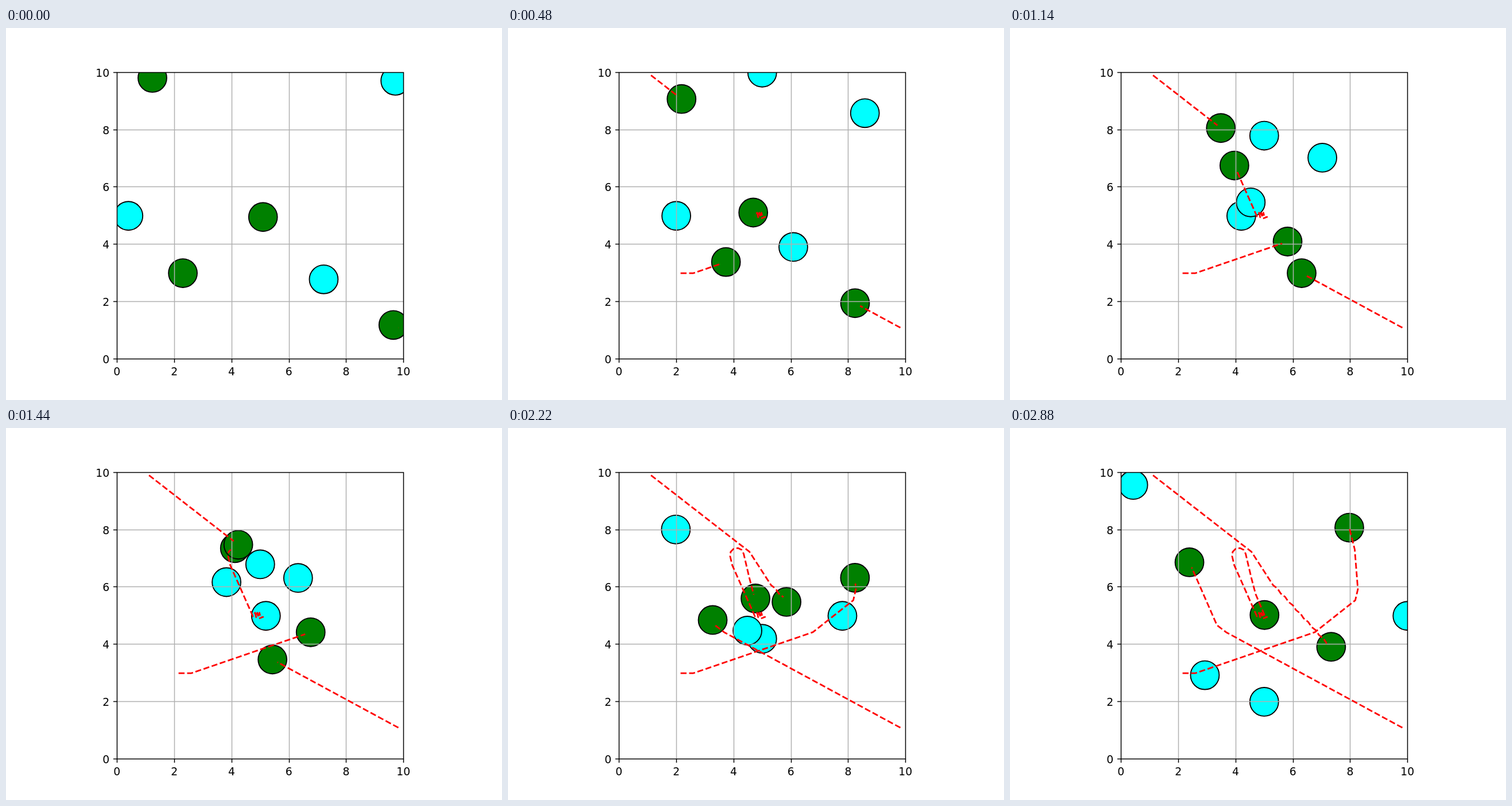
Recreate the animation shown at these times as an HTML page with a canvas. Size 864 px wide and 648 px high, loop 2940 ms.

```html
<!DOCTYPE html>
<html>
<head>
<meta charset="utf-8">
<style>
html, body { margin: 0; width: 100%; height: 100%; overflow: hidden; background: #fff; }
canvas { display: block; }
</style>
</head>
<body>
<canvas id="stage" width="864" height="648"></canvas>
<script>
const ctx = document.getElementById('stage').getContext('2d');
const STEP_MS = 60, STEPS = 49;
const LEFT = 193.32, BOTTOM = 576.72, SIZE = 498.96, UNIT = SIZE / 10;
const SLOW = 0.15, FAST = 0.2;   // units per step
const px = x => LEFT + x * UNIT;
const py = y => BOTTOM - y * UNIT;
// Ruled lines sit on pixel centres
const gridX = v => Math.round(px(v)) + 0.5;
const gridY = v => Math.ceil(py(v) - 0.5) - 0.5;
const range = (n, fn) => Array.from({ length: n }, (_, i) => fn(i));

// Obstacles cross the middle in straight lines
const cross = FAST * Math.SQRT1_2;
const obstacles = [
  k => [0.4 + FAST * k, 5],
  k => [5, 11.6 - FAST * k],
  k => [9.717 - cross * k, 9.717 - cross * k],
  k => [7.217 - cross * k, 2.783 + cross * k]
];

// Walks through corners at a given speed; the length of each leg sets its time
function route(x, y, ...corners) {
  let t = -1;
  const path = [{ t, x, y }];
  for (const [nx, ny, speed = FAST] of corners) {
    t += Math.hypot(nx - x, ny - y) / speed;
    [x, y] = [nx, ny];
    path.push({ t, x, y });
  }
  return path;
}

const jitter = range(6, i => [5.01 - 0.0375 * i, i % 2 ? 5.11 : 4.95, SLOW]);
const turn = range(6, i => {
  const a = (190 - 36 * i) * Math.PI / 180;
  return [4.115 + 0.24 * Math.cos(a), 7.13 + 0.24 * Math.sin(a), SLOW];
});
const zigzag = range(16, i => {
  const pair = i >> 1, odd = i % 2;
  return [5.31 + 0.267 * pair + 0.158 * odd, 6.07 - 0.29 * pair - 0.122 * odd];
});
const agents = [
  route(2.15, 3, [2.6, 3, SLOW], [6.77, 4.43], [8.18, 5.545], [8.27, 5.93], [8.16, 7.32], [7.97, 8.08]),
  route(9.824, 1.095, [3.668, 4.43], [3.35, 4.675], [2.39, 6.87]),
  route(4.96, 4.91, [5.1, 4.96, SLOW], ...jitter, [4.745, 4.985, SLOW], [4.198, 6.219, SLOW],
    [3.955, 6.767], ...turn, [4.55, 6.33, SLOW], [4.7, 5.76, SLOW], [5.01, 5.03, SLOW]),
  route(1.118, 9.908, [3.608, 7.971, SLOW], [4.556, 7.235], ...zigzag)
];

function at(path, k) {
  const i = path.findIndex(p => p.t > k);
  if (i < 1) return path.at(i);
  const a = path[i - 1], b = path[i], f = (k - a.t) / (b.t - a.t);
  return { x: a.x + (b.x - a.x) * f, y: a.y + (b.y - a.y) * f };
}

function line(x0, y0, x1, y1) {
  ctx.beginPath();
  ctx.moveTo(x0, y0);
  ctx.lineTo(x1, y1);
  ctx.stroke();
}

function disc(x, y, color) {
  ctx.beginPath();
  ctx.arc(px(x), py(y), UNIT / 2, 0, Math.PI * 2);
  ctx.fillStyle = color;
  ctx.fill();
  ctx.lineWidth = 1.875;
  ctx.strokeStyle = '#000';
  ctx.stroke();
}

// The trail ends one step behind its agent
function trail(path, k) {
  ctx.beginPath();
  for (const p of [...path.filter(p => p.t < k - 1), at(path, k - 1)]) {
    ctx.lineTo(px(p.x), py(p.y));
  }
  ctx.stroke();
}

function axes() {
  const x0 = gridX(0), y0 = gridY(0);
  ctx.lineWidth = 1.5;
  ctx.strokeStyle = ctx.fillStyle = '#000';
  ctx.strokeRect(x0, y0, gridX(10) - x0, gridY(10) - y0);
  ctx.font = '18.75px "DejaVu Sans", sans-serif';
  for (let v = 0; v <= 10; v += 2) {
    const x = gridX(v), y = gridY(v);
    line(x, y0, x, y0 + 6.5);
    line(x0, y, x0 - 6.5, y);
    ctx.textAlign = 'center';
    ctx.fillText(v, px(v), 605);
    ctx.textAlign = 'right';
    ctx.fillText(v, 180.2, Math.round(py(v) + 7));
  }
}

function draw(k) {
  ctx.fillStyle = '#fff';
  ctx.fillRect(0, 0, 864, 648);

  ctx.save();
  ctx.beginPath();
  ctx.rect(LEFT, BOTTOM - SIZE, SIZE, SIZE);
  ctx.clip();
  for (const move of obstacles) disc(...move(k), '#0ff');
  for (const path of agents) {
    const { x, y } = at(path, k);
    disc(x, y, '#008000');
  }

  ctx.lineWidth = 1.5;
  ctx.strokeStyle = '#b0b0b0';
  for (let v = 2; v < 10; v += 2) {
    line(gridX(v), 77, gridX(v), 577);
    line(193, gridY(v), 693, gridY(v));
  }

  ctx.lineWidth = 2.8125;
  ctx.lineJoin = 'round';
  ctx.strokeStyle = '#f00';
  ctx.setLineDash([10.41, 4.5]);
  for (const path of agents) trail(path, k);
  ctx.restore();

  axes();
}

const start = performance.now();
function tick() {
  draw(Math.floor((performance.now() - start) / STEP_MS) % STEPS);
  requestAnimationFrame(tick);
}
tick();
</script>
</body>
</html>
```
